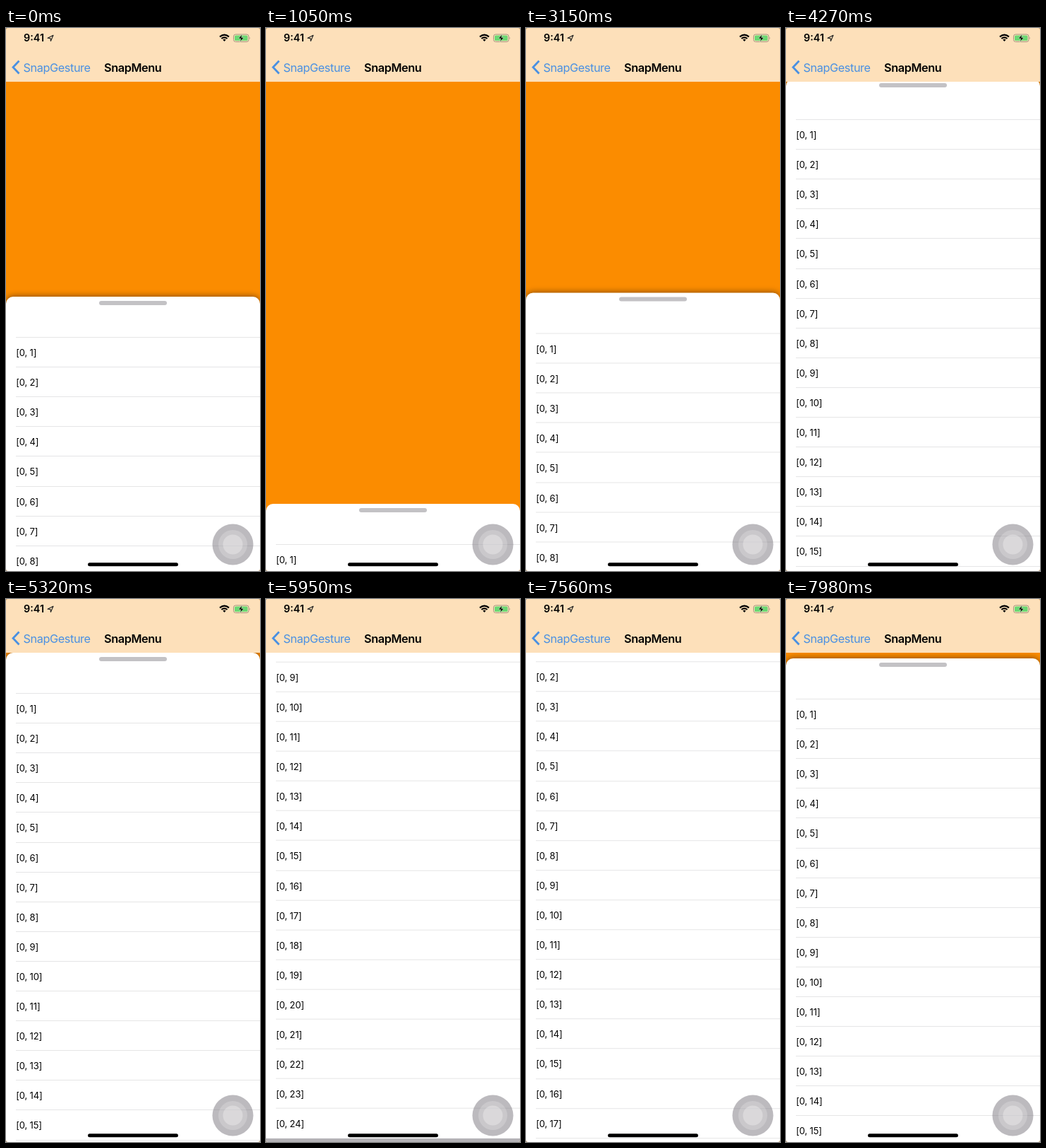
Animation of 360x768 px, one loop 8 s. Source, as an HTML page:

```html
<!DOCTYPE html>
<html lang="en">
<head>
<meta charset="utf-8">
<title>SnapMenu</title>
<style>
  html, body { margin: 0; width: 100%; height: 100%; overflow: hidden; background: #999; }
  body { font-family: Inter, Roboto, sans-serif; color: #000; }
  #stage { position: relative; width: 360px; height: 768px; overflow: hidden; border-radius: 3px; background: #fb8c00; }
  #stage > *, #sheet > * { position: absolute; }
  #sheet {
    left: 0; top: 0; width: 360px; height: 1068.4px; background: #fff;
    border-radius: 10px 10px 0 0; border-bottom: 500px solid #b4b2b6;
    box-shadow: 0 -1px 8px rgba(0, 0, 0, var(--shade));
  }
  #handle { left: 132px; top: 6px; width: 96px; height: 6px; border-radius: 3px; background: #c3c2c5; }
  .row {
    left: 14.2px; right: 0; height: 42.1px; box-sizing: border-box;
    border-top: 1px solid #e5e5e6; font-size: 13px; line-height: 42px; letter-spacing: -.15px;
  }
  #nav { left: 0; top: 0; width: 360px; height: 76px; background: #fde0ba; }
  .label { line-height: 20px; white-space: nowrap; }
  #time { left: 25px; top: 4px; font-size: 14.4px; font-weight: 600; }
  #back, #title { top: 46px; font-size: 16.3px; letter-spacing: -.42px; }
  #back { left: 24.5px; color: #4a90e2; }
  #title { left: 139px; font-weight: 600; }
</style>
</head>
<body>
<div id="stage">
  <div id="sheet"><div id="handle"></div></div>
  <div id="nav"></div>
  <div class="label" id="time">9:41</div>
  <div class="label" id="back">SnapGesture</div>
  <div class="label" id="title">SnapMenu</div>
  <svg width="360" height="768" fill="none">
    <path d="M18.5 46.5 L10 55.5 L18.5 64.5" stroke="#4a90e2" stroke-width="2.8"/>
    <path d="M59 14.2 L67 10.3 L63.4 18.5 L63 14.6 Z" stroke="#222" stroke-width="1.1" stroke-linejoin="round"/>
    <g stroke="#000" stroke-width="2.1">
      <path d="M303 12.4 Q309.5 6.8 316 12.4"/>
      <path d="M305.4 15 Q309.5 11.6 313.6 15"/>
    </g>
    <path d="M307.3 16.6 Q309.5 15 311.7 16.6 L309.5 19 Z" fill="#000"/>
    <rect x="322.5" y="9" width="21.5" height="10.5" rx="3" stroke="#a3957f"/>
    <rect x="324" y="10.5" width="18.5" height="7.5" rx="1.6" fill="#6bd873"/>
    <path d="M345.2 12.4 Q347 14.2 345.2 16 Z" fill="#a3957f"/>
    <path d="M334.6 8.8 L329.6 14.9 H332.8 L331.8 19.6 L337 13.4 H333.7 Z" fill="#000" stroke="#d9f3cf" stroke-width=".5"/>
    <rect x="116" y="756.3" width="128" height="5" rx="2.5" fill="#000"/>
    <circle cx="321.5" cy="730.5" r="29" fill="#807e84" fill-opacity=".53"/>
    <circle cx="321.5" cy="730.5" r="20.5" fill="#fff" fill-opacity=".2"/>
    <circle cx="321.5" cy="730.5" r="14" fill="#fff" fill-opacity=".3"/>
  </svg>
</div>
<script>
const LOOP = 8000, ROWS = 24, HEADER = 57, PITCH = 42.1;
const TOP = 76, MIDDLE = 374.5, BOTTOM = 673, END = -343.6;
const sheet = document.getElementById('sheet');

for (let i = 1; i <= ROWS; i++) {
  const row = document.createElement('div');
  row.className = 'row';
  row.textContent = `[0, ${i}]`;
  row.style.top = HEADER + (i - 1) * PITCH + 'px';
  sheet.append(row);
}

const smooth = u => (1 - Math.cos(Math.PI * u)) / 2;
const speedUp = u => u * u;
const glide = p => u => 1 - (1 - u) ** p;

// Sheet position: [time, y, easing used to arrive there]
const track = [
  [0, 380],
  [930, BOTTOM, smooth],
  [2560, BOTTOM, smooth],
  [3120, MIDDLE, smooth],
  [3450, MIDDLE, smooth],
  [4240, 72, smooth],
  [4600, TOP, smooth],
  [5480, TOP, smooth],
  [5650, TOP - 120, speedUp],
  [6380, END, glide(3.87)],
  [7170, END, smooth],
  [7350, END + 120, speedUp],
  [LOOP, 84, glide(3)]
];

function position(t) {
  const i = track.findIndex(k => k[0] > t);
  const [t0, y0] = track[i - 1], [t1, y1, ease] = track[i];
  return y0 + (y1 - y0) * ease((t - t0) / (t1 - t0));
}

function draw(now) {
  const y = position(now % LOOP);
  const shade = 0.45 * Math.min(1, (BOTTOM - y) / 200);
  sheet.style.transform = `translateY(${y}px)`;
  sheet.style.setProperty('--shade', Math.max(0, shade));
  requestAnimationFrame(draw);
}
draw(0);
</script>
</body>
</html>
```
